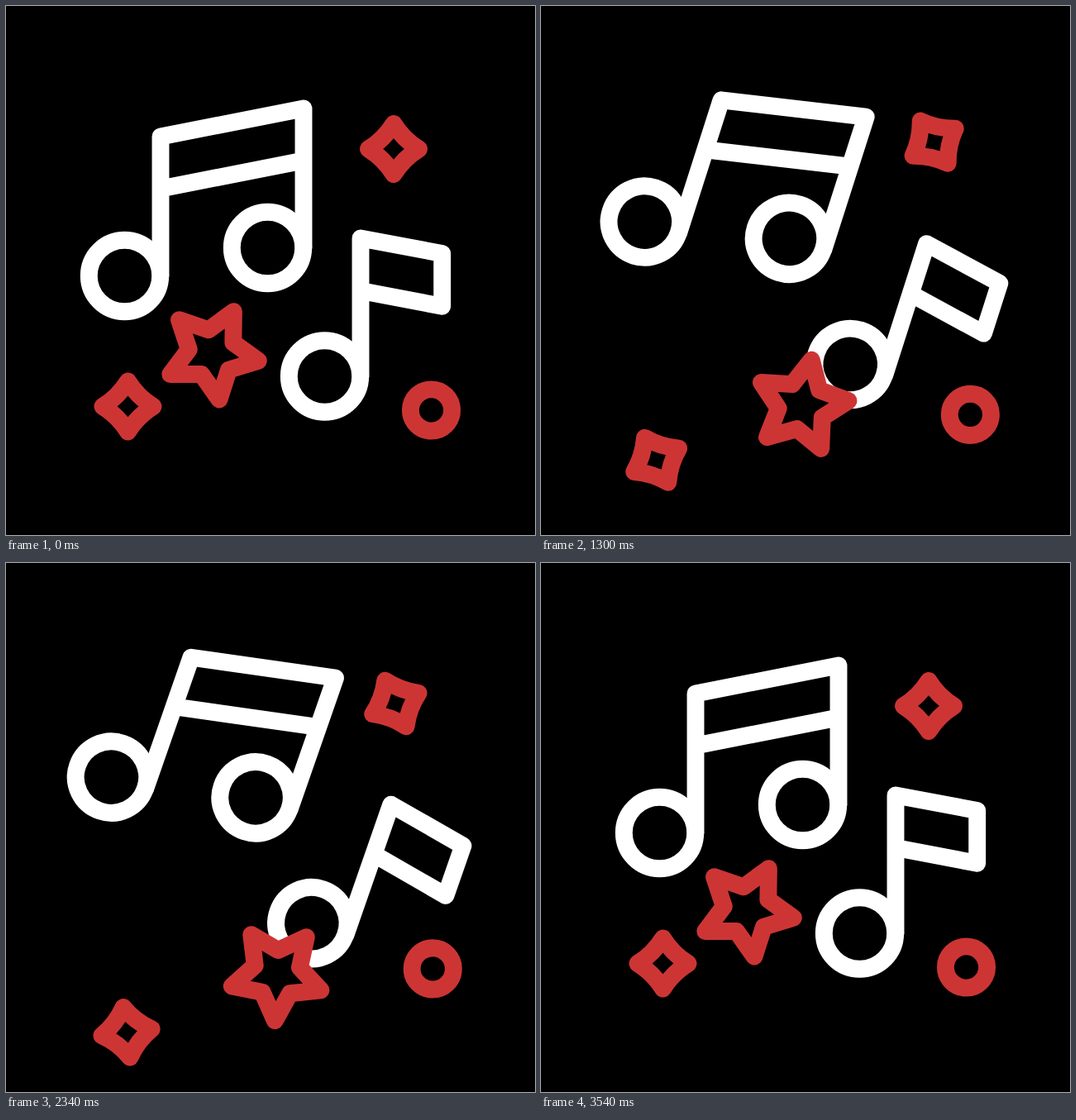
These frames come from a looping animation (640x640 px, 3.6 s). An HTML page:

```html
<!DOCTYPE html>
<html lang="en">
<head>
<meta charset="utf-8">
<title>Dancing notes</title>
<style>
  html, body { margin: 0; width: 100%; height: 100%; overflow: hidden; background: #000; }
  svg { display: block; width: 100%; height: 100%; }
  g { fill: none; stroke-width: 20.9; stroke-linecap: round; stroke-linejoin: round; }
  .note { stroke: #fff; }
  .red { stroke: #cd3535; }
  #star { fill: #000; }
</style>
</head>
<body>
<svg viewBox="0 0 640 640">
  <g id="pair" class="note">
    <circle cx="143.5" cy="326.5" r="43.2"/>
    <circle cx="316.5" cy="292.5" r="43.2"/>
    <path d="M187 326.5V158L360 124V292.5M187 221L360 187"/>
  </g>
  <g id="single" class="note">
    <circle cx="385.5" cy="448" r="43.2"/>
    <path d="M429 448V281L527.7 299.5V363.3L429 344.5"/>
  </g>
  <g id="ring" class="red"><circle r="25.1"/></g>
  <g id="sparkA" class="red"><path/></g>
  <g id="sparkB" class="red"><path/></g>
  <g id="star" class="red"><path/></g>
</svg>
<script>
const LOOP = 3600, END = 3540, BEAT = 600, LAP = 1800;
const $ = id => document.getElementById(id);
const ease = u => u * u * (3 - 2 * u);
const mix = (a, b, w) => a + (b - a) * w;

function place(id, x, y, angle, cx = 0, cy = 0) {
  $(id).setAttribute('transform', `translate(${x} ${y}) rotate(${angle}) translate(${-cx} ${-cy})`);
}

function starPath(outer, inner) {
  let d = 'M';
  for (let i = 0; i < 10; i++) {
    const a = Math.PI * (0.5 + i / 5), r = i % 2 ? inner : outer;
    d += `${r * Math.cos(a)} ${r * Math.sin(a)} `;
  }
  return d + 'Z';
}

function sparkPath(tip, dip) {
  let d = `M${tip} 0`;
  for (let i = 0; i < 4; i++) {
    const a = (i + 0.5) * Math.PI / 2, b = (i + 1) * Math.PI / 2;
    d += `Q${dip * Math.cos(a)} ${dip * Math.sin(a)} ${tip * Math.cos(b)} ${tip * Math.sin(b)}`;
  }
  return d + 'Z';
}

// Every beat swaps between the low pose and the raised one; the loop starts and ends at rest.
function swing(t) {
  const beat = Math.min(5, Math.floor(t / BEAT));
  const start = beat * BEAT;
  const u = Math.min(1, (t - start) / (Math.min(start + BEAT, END) - start));
  const rising = beat % 2 === 0;
  const low = beat > 0 && beat < 5 ? 1 : 0;
  return { lift: rising ? ease(u) : 1 - ease(u), low, kick: rising && low ? 3 * u * (1 - u) ** 2 : 0 };
}

// The star falls, waits a moment and climbs back, twice per loop.
function fall(t) {
  const s = t % LAP, back = Math.min(LAP, END - t + s);
  return s < 890 ? ease(Math.min(1, s / 858)) : 1 - ease(Math.min(1, (s - 890) / (back - 890)));
}

// (x, y) is the pivot at rest, (dx, dy) the lift, down and up the angles, drop how far the low pose sinks.
function dance({ lift, low, kick }, id, x, y, dx, dy, down, up, drop = 0, push = 0) {
  const w = lift + push * kick;
  const note = $(id).classList.contains('note');
  place(id, x + dx * w, mix(y + drop * low, y + dy, w), mix(down * low, up, w), note ? x : 0, note ? y : 0);
}

function draw(t) {
  const s = swing(t), f = fall(t);
  dance(s, 'pair', 330.3, 250.4, -51.9, -65.5, 20, -10);
  dance(s, 'single', 408, 391, 66.3, -65.9, 20, -10);
  dance(s, 'ring', 514.5, 489, 64.3, 71, 0, 0);
  dance(s, 'sparkA', 469, 173, 88.5, -110, -20, -190);
  dance(s, 'sparkB', 147.5, 484.5, -54, -68.5, -3, -173, 87.5, 0.2);
  place('star', mix(249.4, 357.7, f) + 17 * f * (1 - f), mix(420, 531.3, f), mix(-8.7, 216, f));
}

$('star').firstChild.setAttribute('d', starPath(56.7, 28.5));
for (const id of ['sparkA', 'sparkB']) $(id).firstChild.setAttribute('d', sparkPath(30.5, 16.5));

function tick() {
  draw(performance.now() % LOOP);
  requestAnimationFrame(tick);
}
draw(0);
requestAnimationFrame(tick);
</script>
</body>
</html>
```
